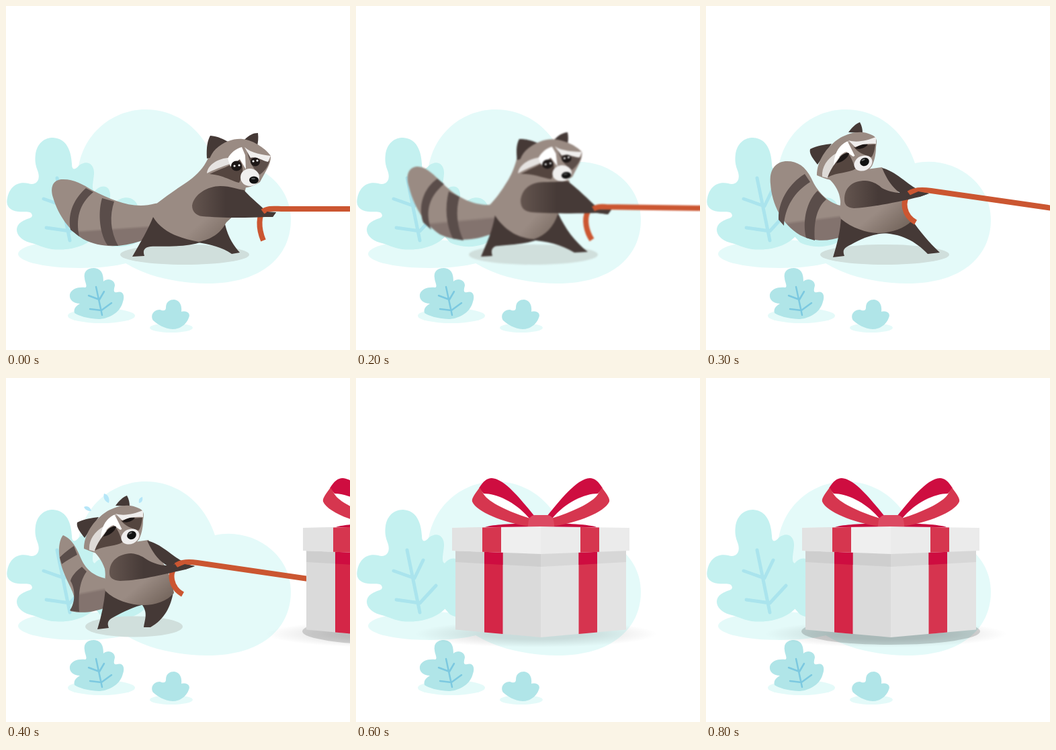
Animation of 512x512 px, one loop 1.8 s. Source, as an HTML page:

```html
<!DOCTYPE html>
<html lang="en">
<head>
<meta charset="utf-8">
<title>Raccoon pulling a gift</title>
<style>
html, body { margin: 0; width: 100%; height: 100%; overflow: hidden; background: #fff; }
svg { display: block; width: 100vw; height: 100vh; }
.vein { fill: none; stroke-linecap: round; stroke-linejoin: round; }
.soft { filter: blur(1px); }
</style>
</head>
<body>
<svg viewBox="0 0 512 512">
  <defs>
    <linearGradient id="tail" x2=".12" y2="1">
      <stop offset=".78" stop-color="#9a8b83"/><stop offset=".82" stop-color="#83736e"/>
    </linearGradient>
    <linearGradient id="body" x1=".3" y1=".3" x2="1" y2=".95">
      <stop offset=".5" stop-color="#9a8b83"/><stop offset=".9" stop-color="#77685f"/>
    </linearGradient>
    <linearGradient id="arm">
      <stop offset="0" stop-color="#64554f"/><stop offset=".4" stop-color="#463a37"/>
    </linearGradient>
    <radialGradient id="mist">
      <stop offset=".4" stop-opacity=".12"/><stop offset="1" stop-opacity="0"/>
    </radialGradient>

    <g id="awake">
      <path fill="#453936" d="M299 227C298 210 300 200 304 193C315 194 325 198 333 204L320 222ZM355 199C362 192 368 189 375 189C376 197 375 203 374 208Z"/>
      <path fill="#9a8b83" d="M299 248C300 235 303 222 312 213C325 201 340 197 352 198C370 200 388 214 394 223C395 235 385 248 378 262C362 273 340 275 312 262Z"/>
      <path fill="#e6e3e1" d="M299 249C300 238 312 228 330 226L336 234C322 239 308 244 299 249Z"/>
      <path fill="#54453f" d="M303 250C318 243 335 238 347 228C354 238 354 250 347 263C338 262 325 252 303 250Z"/>
      <path fill="#fff" d="M330 227C334 219 342 212 351 210L356 222L357 243L348 228L334 239Z"/>
      <path fill="#5d4f4a" d="M359 217C366 223 382 225 392 231C390 240 383 247 378 251C370 245 363 235 359 217Z"/>
      <path fill="#f0eeed" d="M355 210C364 219 384 222 394 223L390 232C380 230 374 224 364 226Z"/>
      <ellipse cx="343" cy="238" rx="8" ry="7.5" fill="#1d1716"/>
      <ellipse cx="371" cy="232" rx="7" ry="6.500" fill="#1d1716"/>
      <path stroke="#fff" stroke-width="3" stroke-linecap="round" d="M340 238h.1M347 237h.1M368 231h.1M374 230h.1"/>
      <ellipse cx="363" cy="255" rx="14" ry="13" fill="#f0efee"/>
      <ellipse cx="369" cy="259" rx="7" ry="5.5" fill="#111"/>
      <ellipse cx="368" cy="257" rx="3" ry="1.2" fill="#555"/>
    </g>

    <g id="straining">
      <path fill="#453936" d="M155 213C165 208 177 206 187 205L166 236C160 228 153 220 155 213ZM212 188C217 181 223 175 229 173C232 178 233 184 233 189Z"/>
      <path fill="#9a8b83" d="M165 252C165 232 178 210 200 196C215 188 232 184 247 192C256 196 254 203 253 210C253 222 250 232 247 238C230 262 195 264 175 256Z"/>
      <path fill="#dedad7" d="M173 254C172 240 180 227 194 219L200 227C190 238 184 247 181 256Z"/>
      <path fill="#54453f" d="M181 255C186 240 198 225 210 218C217 224 219 235 223 242C213 249 195 247 181 255Z"/>
      <path fill="#fff" d="M191 228C194 212 203 204 212 201L224 222L219 224L209 217C201 219 195 228 190 237Z"/>
      <path fill="#9a8b83" d="M210 200L220 210L230 222L222 224Z"/>
      <path fill="#54453f" d="M220 210C232 207 245 206 252 206C251 215 249 222 246 225C236 222 226 218 220 210Z"/>
      <path fill="#efedec" d="M212 200C225 204 240 200 253 195L253 205C243 204 232 206 222 210Z"/>
      <path fill="#1d1716" d="M194 234C198 224 206 217 213 219C212 226 202 233 194 234ZM222 212C228 206 236 205 241 206C237 212 228 214 222 212Z"/>
      <ellipse cx="234" cy="234" rx="14" ry="11" fill="#efeded" transform="rotate(-25 234 234)"/>
      <ellipse cx="236" cy="232" rx="7" ry="6" fill="#111" transform="rotate(-25 236 232)"/>
      <ellipse cx="234" cy="229" rx="3" ry="1.2" fill="#666" transform="rotate(-25 234 229)"/>
    </g>

    <g id="loop">
      <path fill="#fff" d="M188 171C212 172 240 185 259 208C235 206 198 192 188 171Z"/>
      <path fill="#ce0d40" d="M183 164C189 154 195 149 202 149C222 150 247 183 266 206L258 209C238 185 210 172 190 172Z"/>
      <path fill="#d6364f" d="M184 163C175 175 172 180 173 184C180 200 220 215 257 221L259 209C230 200 198 186 190 173Z"/>
    </g>
  </defs>

  <path fill="#e4faf9" d="M107 250C110 195 155 154 208 154C255 154 295 185 311 234C365 222 424 260 424 318C424 372 382 413 300 413C250 412 210 402 180 384C140 360 105 310 107 250Z"/>
  <g fill="#e4faf9">
    <ellipse cx="110" cy="369" rx="92" ry="21"/>
    <ellipse cx="142" cy="461" rx="50" ry="11"/>
    <ellipse cx="246" cy="479" rx="32" ry="7"/>
  </g>
  <path fill="#c4f1f0" d="M131 277C140 264 157 265 155 285C154 298 160 298 163 292C175 280 196 284 197 303C196 314 198 317 205 316C218 317 216 338 205 345C190 360 160 362 140 352L120 330Z"/>
  <path fill="#c4f1f0" d="M70 196C90 197 97 215 98 235C98 245 103 244 108 238C120 228 132 235 131 250C130 262 126 275 133 276L150 300L133 343C115 362 85 364 68 362C55 360 48 355 35 352C15 346 11 330 22 322C32 315 38 317 39 312C38 304 30 307 18 306C2 304 0 294 2 286C6 266 20 261 33 264C46 268 52 258 47 245C43 235 43 228 44 220C47 203 58 196 70 196Z"/>
  <path class="vein" stroke="#aae4ed" stroke-width="5" d="M76 256L95 349M56 287L87 298L100 271M60 330L95 335L119 309"/>
  <path fill="#b0e5e8" d="M117 405C115 393 124 390 131 390C143 391 145 400 145 410C152 404 162 408 162 416C160 424 160 427 165 426C175 423 177 432 174 440C170 458 150 466 138 466C120 465 108 461 102 457C100 450 105 446 110 443C98 442 94 436 95 429C98 420 108 418 118 419C122 418 117 410 117 405Z"/>
  <path class="vein" stroke="#7cc9e0" stroke-width="2.5" d="M134 418L143 460M123 431L139 437L146 425M125 451L142 453L157 442"/>
  <path fill="#b0e5e8" d="M238 449C238 440 244 437 250 437C259 438 262 446 261 455C270 453 275 458 272 464C268 475 258 481 248 481C235 480 226 474 219 468C214 460 220 452 229 452C234 454 238 454 238 449Z"/>

  <g id="raccoon"></g>

  <g id="gift">
    <ellipse cx="268" cy="381" rx="180" ry="20" fill="url(#mist)"/>
    <ellipse id="shade" cx="275" cy="377" rx="133" ry="20" fill-opacity=".16"/>
    <path fill="#dadada" d="M148 255V374.500L275 386V255Z"/>
    <path fill="#e3e3e3" d="M275 255V386L402 374.500V255Z"/>
    <path fill="#d42647" d="M191 258H218.500V381L191 378.500Z"/>
    <path fill="#d6344f" d="M331.500 258H359V378.500L331.500 381Z"/>
    <path fill-opacity=".055" d="M148 255V274L275 281L402 274V255Z"/>
    <path fill="#ce0d40" d="M191 258H218.500V278L191 276.500ZM331.500 258H359V276.500L331.500 278Z"/>
    <path fill="#c90c3e" d="M192 222C210 214 340 214 358 222Z"/>
    <path fill="#efefef" d="M143 223L275 221V262L143 257Z"/>
    <path fill="#ebebeb" d="M275 221L407 223V257L275 262Z"/>
    <path fill="#e2e2e2" d="M143 223L188 222V258.700L143 257Z"/>
    <path fill="#d6364f" d="M188 222.400L216 222V259.800L188 258.700ZM334 222L362 222.400V258.700L334 259.800Z"/>
    <use href="#loop"/>
    <use href="#loop" transform="matrix(-1 0 0 1 550 0)"/>
    <path fill="#dc4a62" d="M256 221C256 210 259 205 266 204H285C292 205 295 210 295 221Z"/>
  </g>
</svg>
<script>
const DARK = '#453936', RING = '#5a4d4a';
// Body parts from back to front.
const fills = { tail: 'url(#tail)', ring1: RING, ring2: RING, legR: DARK, legL: DARK,
  body: 'url(#body)', farArm: DARK, head: '', strand: '', arm: 'url(#arm)', rope: '', hand: DARK };

const reach = {
  shadow: '266 370 96 15',
  tail: 'M222 294C190 303 160 290 130 275C112 264 100 257 82 258C68 260 66 272 70 285C78 312 95 335 115 347C140 360 170 360 200 350C222 340 235 320 240 300C238 296 230 293 222 294',
  ring1: 'M119 271C98 290 92 312 96 333L109 343C104 318 108 295 130 277',
  ring2: 'M143 286C136 310 140 340 151 356L167 357C155 335 154 312 161 291',
  legR: 'M326 325C331 346 340 358 348 367L336 369C322 359 305 355 280 351C290 338 312 328 326 325',
  legL: 'M219 314C212 332 200 352 188 373L206 372C203 364 206 359 215 358C235 357 265 360 292 351C270 330 240 320 219 314',
  body: 'M302 224C295 240 285 252 265 265C245 278 230 290 220 297C214 303 215 309 219 314C232 336 258 346 287 351C305 347 318 340 328 322C345 308 355 290 358 262',
  farArm: 'M352 274C362 284 375 296 389 307L380 308C365 300 355 290 352 274',
  head: '1 0 0 1 0 0',
  strand: 'M384 306C376 310 375 330 383 349',
  arm: 'M277 297C280 280 300 268 319 268C335 268 345 273 354 274C366 287 380 298 389 307L402 307L397 314L386 314C350 316 315 315 292 313C283 312 277 306 277 297',
  rope: 'M516 302L413 302C400 302 390 300 382 306',
  hand: 'M388 306L402 307L397 314L386 314'
};
const lean = {
  shadow: '264 370 96 15',
  tail: 'M200 296C175 297 150 285 130 265C115 250 103 238 90 239C76 241 74 255 79 270C86 298 102 325 125 340C150 352 178 349 205 338C215 325 218 310 215 298C211 296 206 295 200 296',
  ring1: 'M121 257C100 272 92 298 100 322L112 333C103 308 107 285 131 265',
  ring2: 'M138 276C132 300 134 325 144 346L160 349C150 328 148 305 154 284',
  legR: 'M301 309C312 332 325 350 345 366L325 367C305 355 285 350 258 348C268 328 285 316 301 309',
  legL: 'M207 311C203 335 195 352 186 373L203 372C200 363 203 357 213 357C230 355 250 355 270 348C250 328 228 318 207 311',
  body: 'M240 224C236 242 230 254 222 266C212 282 205 290 199 296C201 302 204 307 207 312C222 335 243 346 265 347C283 341 294 328 300 311C310 298 317 280 318 260',
  farArm: 'M315 261C330 272 345 287 360 301L350 302C335 295 322 280 315 261',
  head: '1.017 -.09 .059 .907 -77.600 50.300',
  strand: 'M345 306C339 318 343 336 351 348',
  arm: 'M245 289C247 272 260 262 280 262C295 262 305 261 315 261C330 272 345 287 358 302L380 303L375 310L360 308C330 309 290 309 262 307C250 306 245 300 245 289',
  rope: 'M516 301L372 299C364 298 358 299 353 302',
  hand: 'M358 304L380 303L375 310L358 308'
};
const pull = {
  shadow: '266 370 96 15',
  tail: 'M200 297C180 292 165 275 157 257C148 238 135 230 118 231C100 233 94 248 96 265C98 295 113 325 140 341C160 351 182 351 203 343C207 330 206 310 200 297C200 297 200 297 200 297',
  ring1: 'M147 250C125 263 107 290 108 318L116 327C117 300 132 276 155 262',
  ring2: 'M166 275C150 290 143 320 149 345L162 349C160 325 164 300 179 288',
  legR: 'M306 318C318 335 332 352 348 367L330 369C312 350 290 338 258 338C270 325 290 318 306 318',
  legL: 'M201 315C200 335 195 355 189 374L206 372C203 364 205 361 212 357C225 350 245 338 272 338C255 325 225 318 201 315',
  body: 'M175 252C186 258 194 268 198 280C200 288 201 294 199 299C198 305 198 311 201 317C218 331 240 338 258 338C278 337 295 331 306 320C300 300 290 278 262 240',
  farArm: 'M262 241C282 246 298 264 315 273L296 282C280 275 270 260 262 241',
  head: '1.053 -.504 .19 .8 -201.800 210.800',
  strand: 'M302 280C291 290 294 312 312 322',
  arm: 'M206 288C206 270 218 260 237 260C250 261 256 266 262 271C272 276 285 280 300 277L318 276L332 279L318 284C285 292 245 300 220 301C210 300 206 296 206 288',
  rope: 'M516 301L335 275C322 273 310 273 302 279',
  hand: 'M296 285L316 276L332 279L318 284'
};
const haul = {
  shadow: '190.500 370 72.500 15.500',
  tail: 'M147 298C130 294 118 285 110 265C103 248 95 238 85 234C78 242 77 262 82 278C90 305 104 320 102 335C100 343 96 346 96 347C115 351 130 348 145 343C152 330 152 312 147 298',
  ring1: 'M101 250C92 256 85 262 80 267L83 277C90 272 98 267 106 263',
  ring2: 'M113 281C104 288 98 294 96 302C104 315 103 335 95 346L109 348C108 325 108 305 120 288',
  legR: 'M249 318C246 340 235 360 215 371L205 371C207 358 211 350 203 338C215 325 235 318 249 318',
  legL: 'M148 315C146 335 142 355 136 374L153 372C150 364 152 360 160 356C175 348 190 340 207 337C190 325 165 318 148 315',
  body: 'M125 254C135 260 143 272 147 284C148 291 148 296 147 300C146 306 146 312 148 317C162 331 185 338 205 338C222 338 240 332 250 320C248 300 238 278 212 241',
  farArm: 'M210 242C230 246 247 265 263 273L245 282C229 275 218 260 210 242',
  strand: 'M253 280C242 290 245 312 263 322',
  arm: 'M154 290C154 272 167 262 186 261C198 262 205 267 211 271C222 277 235 281 249 278L267 277L281 280L267 285C233 293 195 302 170 302C158 301 154 297 154 290',
  rope: 'M450 299L285 275C272 273 261 273 253 279',
  hand: 'M245 286L266 277L281 280L267 285'
};

const path = (fill, d) => `<path fill="${fill}" d="${d}Z"/>`;
const rope = d => `<path fill="none" stroke="#cb5631" stroke-width="8" d="${d}"/>`;

// Averages every number of two poses that share the same outline structure.
function midway(a, b) {
  const number = /-?\d*\.?\d+/g, pose = {};
  for (const key in a) {
    const other = b[key].match(number);
    let i = 0;
    pose[key] = a[key].replace(number, n => (+n + +other[i++]) / 2);
  }
  return pose;
}

function raccoon(pose, head = `<use href="#awake" transform="matrix(${pose.head})"/>`) {
  const [x, y, rx, ry] = pose.shadow.split(' ');
  const parts = Object.keys(fills).map(key =>
    key === 'head' ? head : fills[key] ? path(fills[key], pose[key]) : rope(pose[key]));
  return `<ellipse cx="${x}" cy="${y}" rx="${rx}" ry="${ry}" fill="#d0dfdc"/>` + parts.join('');
}

const soft = art => `<g class="soft">${art}</g>`;
const sweat = path('#b5e6f8', 'M116 192C121 189 126 193 127 198C121 198 118 196 116 192ZM146 172C152 173 155 180 153 186C147 184 144 178 146 172ZM203 177C204 182 202 186 198 186C197 181 199 178 203 177');

// The raccoon slipping behind the foliage.
const leaving = [
  ['#d0dfdc', 'M52 384C60 375 75 362 88 355C140 352 190 360 190 372C180 386 110 386 52 384'],
  ['#9a8b83', 'M78 232C86 225 90 210 96 209C100 235 108 245 130 275L146 323L98 339C94 325 92 310 91 297L79 262'],
  ['#75665f', 'M130 290L146 323L112 338C124 325 128 310 130 290'],
  ['#8a7b74', 'M74 184L97 197L95 204L75 196'],
  ['#54453f', 'M76 197L95 200L93 212L86 209'],
  ['#efedec', 'M76 205L96 196L97 209L90 207ZM79 244C88 241 93 235 90 228C85 232 88 238 79 244'],
  [DARK, 'M104 241C125 248 143 268 152 273L135 281C122 270 113 258 104 241'],
  [DARK, 'M79 261C90 264 120 274 135 280L170 281L130 292C115 295 100 297 92 297C84 285 79 275 79 261'],
  [DARK, 'M98 339C120 336 140 330 146 323C155 338 166 354 177 368L158 369C140 356 120 342 98 339']
].map(part => path(...part)).join('') +
  rope('M322 298L175 276C165 274 155 273 140 278C129 283 128 310 143 323') +
  path(DARK, 'M135 286L150 279L170 281L150 287');

// Start time, raccoon, gift offset, strength of the contact shadow.
const steps = [
  [0, raccoon(reach), 512, 1],
  [100, soft(raccoon(midway(reach, lean))), 512, 1],
  [200, soft(raccoon(lean)), 512, 1],
  [250, soft(raccoon(midway(lean, pull))), 512, 1],
  [300, raccoon(pull, '<use href="#straining"/>'), 512, 1],
  [400, raccoon(haul, '<use href="#straining" x="-49" y="2"/>') + sweat, 299, 1],
  [500, soft(leaving), 171, 1],
  [600, '', 0, 0],
  [700, '', -13, 1],
  [800, '', 0, 1]
];

const el = id => document.getElementById(id);
let shown;
function draw(now) {
  const time = now % 1800;
  const step = steps.findLast(s => s[0] <= time) || steps[0];
  if (step !== shown) {
    const [, art, x, shade] = shown = step;
    el('raccoon').innerHTML = art;
    el('gift').setAttribute('transform', `translate(${x})`);
    el('shade').setAttribute('opacity', shade);
  }
  requestAnimationFrame(draw);
}
draw(performance.now());
</script>
</body>
</html>
```
